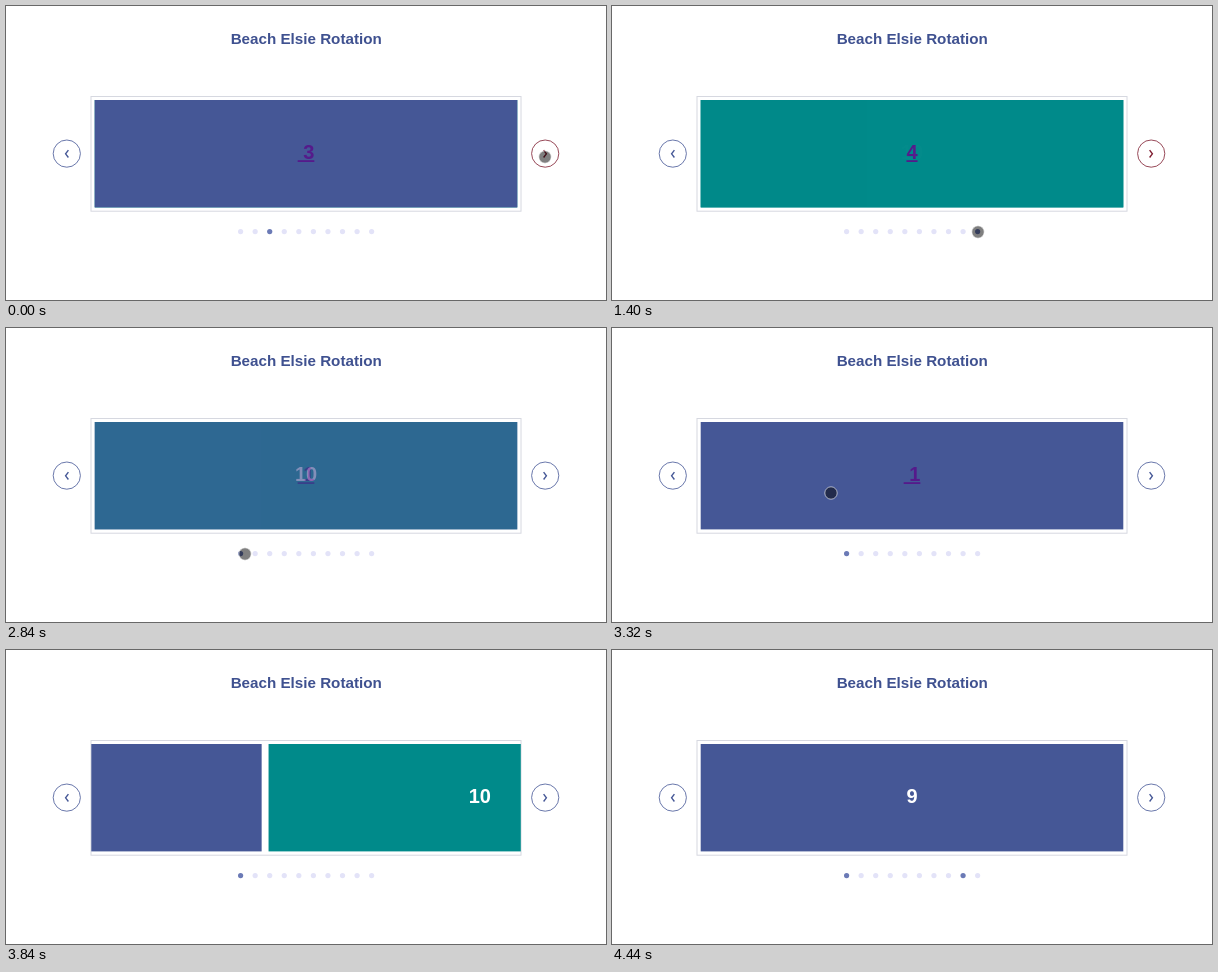
These frames come from a looping animation (600x294 px, 4.48 s). An HTML page:

```html
<!DOCTYPE html>
<html lang="en">
<head>
<meta charset="utf-8">
<title>Slide show</title>
<style>
  html, body { margin: 0; width: 100%; height: 100%; overflow: hidden; background: #fff; }
  svg { display: block; width: 600px; height: 294px; }
  text { font-family: "Liberation Sans", Arial, sans-serif; font-weight: bold; text-anchor: middle; }
</style>
</head>
<body>
<svg id="stage" viewBox="0 0 600 294">
  <defs>
    <clipPath id="view"><rect x="85.3" y="91" width="429.5" height="114"/></clipPath>
  </defs>
  <text x="300.2" y="38" font-size="15.2" fill="#3f5190">Beach Elsie Rotation</text>
  <rect x="85" y="90.5" width="430" height="114.7" fill="#fff" stroke="#d6d8e0"/>
  <g id="slides" clip-path="url(#view)"></g>
  <g id="buttons" fill="none"></g>
  <g id="dots"></g>
  <circle id="cursor" r="6.2" fill="#000" fill-opacity=".5" stroke="#fff" stroke-opacity=".6"/>
</svg>
<script>
const LOOP = 4480;
const STEP = 429.5;            // distance between neighbouring slides
const BLUE = [69, 87, 150], RED = [127, 29, 48];
const SWIPE = { start: 3330, release: 3722, from: 219, to: 558, y: 165 };
const FADE = 400;

const $ = id => document.getElementById(id);
const clamp = v => Math.max(0, Math.min(1, v));
const span = (t, a, b) => clamp((t - a) / (b - a));
const lerp = (a, b, p) => a + (b - a) * p;
const smooth = p => p * p * (3 - 2 * p);

function add(parent, tag, attrs) {
  const el = document.createElementNS("http://www.w3.org/2000/svg", tag);
  for (const k in attrs) el.setAttribute(k, attrs[k]);
  parent.appendChild(el);
  return el;
}

// the standard CSS "ease" curve
function ease(x) {
  const curve = (s, a, b) => 3 * (1 - s) * (1 - s) * s * a + 3 * (1 - s) * s * s * b + s * s * s;
  let lo = 0, hi = 1;
  for (let i = 0; i < 24; i++) {
    const mid = (lo + hi) / 2;
    if (curve(mid, .25, .25) < x) lo = mid; else hi = mid;
  }
  return curve(lo, .1, 1);
}

// linked labels are underlined; some carry a leading space
const LINKS = { 1: 5.56, 3: 5.56, 4: 0 };

function makeSlide(n) {
  const g = add($("slides"), "g", {});
  const linked = n in LINKS, pad = LINKS[n] || 0;
  const ink = linked ? "#551a8b" : "#fff";
  add(g, "rect", { x: 88.7, y: 94, width: 422.6, height: 107.4, fill: n % 2 ? "#455796" : "#008a8a" });
  add(g, "text", { x: 300 + pad / 2, y: 152.7, "font-size": 20, fill: ink }).textContent = n;
  if (linked) {
    const w = 11.12 + pad;
    add(g, "rect", { x: 300 - w / 2, y: 154.2, width: w, height: 1.8, fill: ink });
  }
  return g;
}

function makeButton(x, dir) {
  const g = add($("buttons"), "g", {});
  add(g, "circle", { cx: x, cy: 147.6, r: 13.6, "stroke-width": 1, "stroke-opacity": .8 });
  add(g, "path", {
    d: `M${x - dir * 1.6} 144.1L${x + dir * 1.2} 147.8L${x - dir * 1.6} 151.5`,
    "stroke-width": 1.4
  });
  return g;
}

const slides = {};
for (const n of [1, 10, 9, 4, 3]) slides[n] = makeSlide(n);

makeButton(60.8, -1).setAttribute("stroke", `rgb(${BLUE})`);
const next = makeButton(539.2, 1);

const dots = Array.from({ length: 10 }, (_, i) =>
  add($("dots"), "circle", { cx: 234.6 + 14.56 * i, cy: 225.6, r: 2.6 }));

// time, x, y
const PATH = [
  [0, 539, 151], [470, 539, 151], [680, 454, 182], [960, 366, 226], [1420, 366, 226],
  [1720, 338, 235.5], [2000, 290, 237.5], [2240, 252, 235], [2400, 239, 226],
  [2960, 239, 226], [3260, SWIPE.from, SWIPE.y]
];

function cursorAt(t) {
  if (t >= SWIPE.start) return [SWIPE.from + dragAt(t), SWIPE.y];
  let i = 0;
  while (i < PATH.length - 2 && t >= PATH[i + 1][0]) i++;
  const [a, b] = [PATH[i], PATH[i + 1]];
  const p = smooth(span(t, a[0], b[0]));
  return [lerp(a[1], b[1], p), lerp(a[2], b[2], p)];
}

function dragAt(t) {
  return (SWIPE.to - SWIPE.from) * Math.pow(span(t, SWIPE.start, SWIPE.release), 1.6);
}

function offsetAt(t) {
  return lerp(dragAt(t), 2 * STEP, ease(span(t, SWIPE.release, SWIPE.release + FADE)));
}

function put(n, x, opacity) {
  slides[n].setAttribute("transform", `translate(${x.toFixed(2)} 0)`);
  slides[n].setAttribute("opacity", opacity);
}

// the leaving slide dissolves over the arriving one
function crossfade(from, to, p) {
  $("slides").append(slides[to], slides[from]);
  put(to, 0, 1);
  put(from, 0, 1 - p);
}

function drawSlides(t) {
  for (const n in slides) put(n, 0, 0);
  if (t < 1390) crossfade(3, 4, ease(span(t, 484, 484 + FADE)));
  else if (t < 2685) crossfade(4, 10, ease(span(t, 1390, 1390 + FADE)));
  else if (t < SWIPE.start) crossfade(10, 1, ease(span(t, 2685, 2685 + FADE)));
  else {
    const x = offsetAt(t);
    [1, 10, 9].forEach((n, k) => put(n, x - k * STEP, 1));
  }
}

function drawDots(t) {
  const active = t < 484 ? 3 : t < 1360 ? 4 : t < 2685 ? 10 : 1;
  dots.forEach((dot, i) => {
    const on = i + 1 === active || (i === 8 && t >= 4400);
    dot.setAttribute("fill", on ? "#6b7ab6" : "#e3e3f8");
  });
}

function draw(t) {
  drawSlides(t);
  drawDots(t);
  const p = smooth(span(t, 1420, 1620));
  next.setAttribute("stroke", `rgb(${RED.map((c, i) => Math.round(lerp(c, BLUE[i], p)))})`);
  const [x, y] = cursorAt(t), cursor = $("cursor");
  cursor.setAttribute("cx", x.toFixed(2));
  cursor.setAttribute("cy", y.toFixed(2));
  cursor.setAttribute("visibility", t < 3770 ? "visible" : "hidden");
}

const begin = performance.now();
function tick() {
  draw((performance.now() - begin) % LOOP);
  requestAnimationFrame(tick);
}
tick();
</script>
</body>
</html>
```
